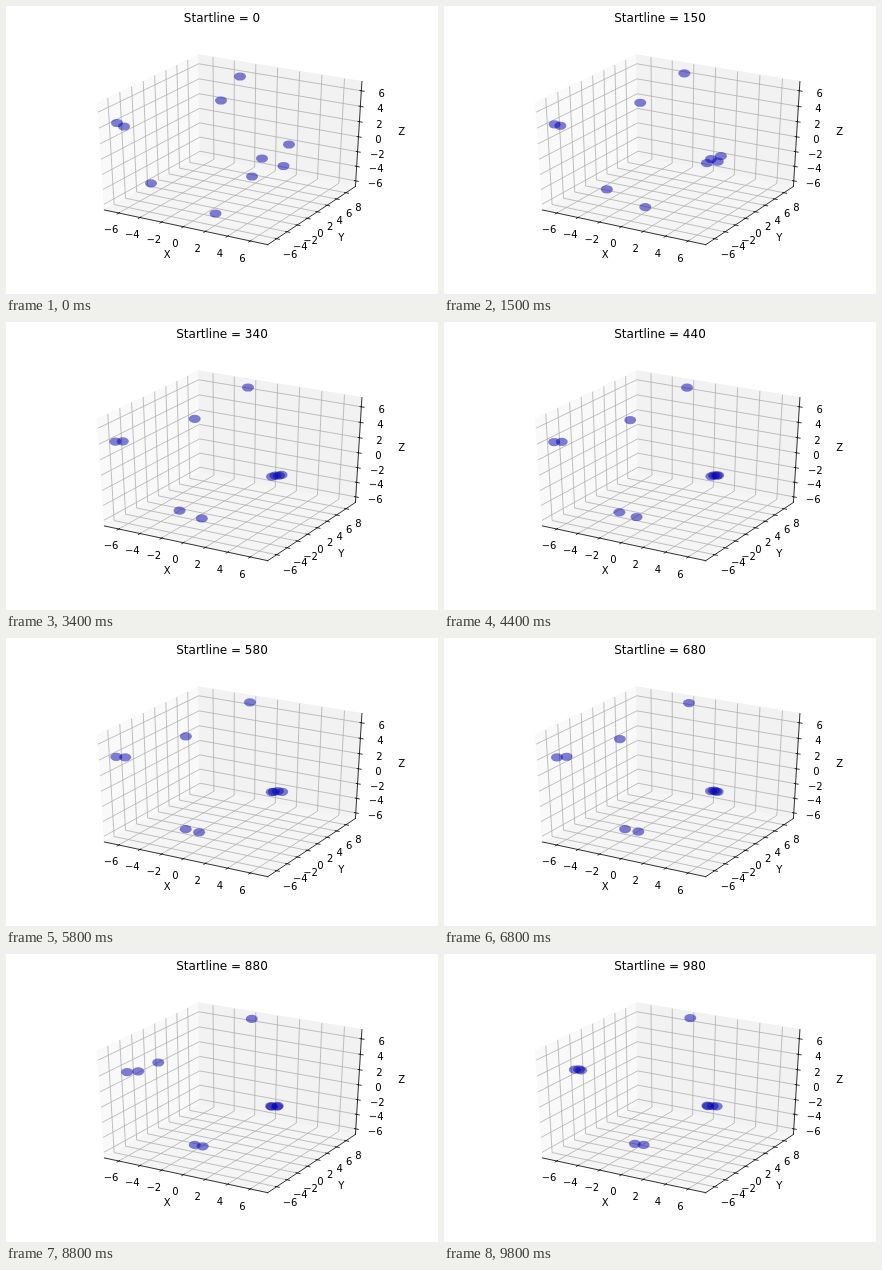
An HTML page for the animation above (9.9 s loop, 432x288 px).

```html
<!DOCTYPE html>
<html lang="en">
<head>
<meta charset="utf-8">
<title>Startline</title>
<style>
  html, body { margin: 0; width: 100%; height: 100%; overflow: hidden; background: #fff; }
  svg { display: block; width: 432px; height: 288px; }
  text { font-family: "DejaVu Sans", sans-serif; font-size: 10px; text-anchor: middle; }
  #title { font-size: 12px; }
  .grid { fill: none; stroke: #b0b0b0; stroke-width: 0.8; }
  .axis { fill: none; stroke: #000; stroke-width: 0.8; stroke-linecap: square; }
  .ball { fill: #0000b0; fill-opacity: 0.5; }
</style>
</head>
<body>
<svg id="stage" viewBox="0 0 432 288">
  <g id="box"></g>
  <g id="balls"></g>
  <text id="title" x="216" y="16"></text>
</svg>
<script>
const $ = id => document.getElementById(id);
const box = $('box'), title = $('title');

function add(parent, name, attrs, text) {
  const el = document.createElementNS('http://www.w3.org/2000/svg', name);
  for (const k in attrs) el.setAttribute(k, attrs[k]);
  if (text) el.textContent = text;
  parent.appendChild(el);
  return el;
}

// Perspective view of a unit cube centred on 0: azimuth -60°, elevation 30°, distance 10.
const C = Math.sqrt(3) / 2;
function project([x, y, z]) {
  const depth = 10 - (C / 2 * x - 0.75 * y + 0.5 * z);
  const u = (C * x + 0.5 * y) / depth;
  const v = (-0.25 * x + C / 2 * y + C * z) / depth;
  return [54 + (u + 0.095) / 0.185 * 334.8, 252 - (v + 0.095) / 0.185 * 217.44];
}
const path = pts => 'M' + pts.map(p => project(p).map(n => n.toFixed(2)).join(' ')).join('L');
const line = (cls, ...pts) => add(box, 'path', { class: cls, d: path(pts) });
const pane = (fill, ...pts) => add(box, 'path', { fill, stroke: fill, d: path(pts) + 'Z' });

function label(text, pos, dy) {
  const [x, y] = project(pos);
  add(box, 'text', { x: x.toFixed(1), y: Math.round(y + dy) }, text);
}

const H = 0.5 + 1 / 48;         // half size of the drawn box
const OUT = H + 1 / 60, IN = H - 1 / 120;
const NEAR = H + 0.0833, FAR = H + 0.1811;

const axes = [
  { name: 'X', lo: -7.07, hi: 7.23, last: 6, ends: [[-H, -H, -H], [H, -H, -H]],
    grid: a => [[a, H, H], [a, H, -H], [a, -H, -H]],
    tick: a => [[a, -OUT, -H], [a, -IN, -H]],
    at: (a, d) => [a, -d, -d] },
  { name: 'Y', lo: -7.33, hi: 9.7, last: 8, ends: [[H, -H, -H], [H, H, -H]],
    grid: a => [[-H, a, H], [-H, a, -H], [H, a, -H]],
    tick: a => [[OUT, a, -H], [IN, a, -H]],
    at: (a, d) => [d, a, -d] },
  { name: 'Z', lo: -6.5, hi: 6.9, last: 6, ends: [[H, H, -H], [H, H, H]],
    grid: a => [[-H, -H, a], [-H, H, a], [H, H, a]],
    tick: a => [[OUT, H, a], [IN, H, a]],
    at: (a, d) => [d, d, a] }
];

pane('#f9f9f9', [-H, -H, -H], [-H, H, -H], [-H, H, H], [-H, -H, H]);
pane('#f2f2f2', [-H, H, -H], [H, H, -H], [H, H, H], [-H, H, H]);
pane('#f5f5f5', [-H, -H, -H], [H, -H, -H], [H, H, -H], [-H, H, -H]);

const eachTick = (ax, fn) => {
  for (let v = -6; v <= ax.last; v += 2) fn((v - ax.lo) / (ax.hi - ax.lo) - 0.5, v);
};
for (const ax of axes) eachTick(ax, a => line('grid', ...ax.grid(a)));
for (const ax of axes) {
  line('axis', ...ax.ends);
  eachTick(ax, (a, v) => {
    line('axis', ...ax.tick(a));
    label(String(v).replace('-', '\u2212'), ax.at(a, NEAR), 7.6);
  });
  label(ax.name, ax.at(0, FAR), 3.04);
}

// Balls relax from their starts towards a hub, side by side; the hub drifts away late in the loop.
const hubs = [
  { at: [113, 120], drift: [21, -4], gap: 9, settle: 20, starts: [[111, 117], [118, 120.5]] },
  { at: [186, 192.5], drift: [10, -2], gap: 7, settle: 25, starts: [[145, 177.3], [209.5, 207.5]] },
  { at: [186, 97], drift: [-52, 18.5], gap: 0, settle: 15, starts: [[215, 94.5]] },
  { at: [245, 64.5], drift: [0, 0], gap: 0, settle: 25, starts: [[234, 70.5]] },
  { at: [271, 153.5], drift: [-4, -1.5], gap: 3, settle: 10,
    starts: [[246, 170.5], [256, 152.5], [277.5, 160], [283, 138.5]] }
];

const noise = n => {
  const s = Math.sin(n * 127.1 + 11.7) * 43758.5453;
  return (s - Math.floor(s)) * 2 - 1;
};

const balls = hubs.flatMap(hub => hub.starts.map((start, k) => ({
  hub, start,
  side: (k - (hub.starts.length - 1) / 2) * hub.gap,
  el: add($('balls'), 'ellipse', { class: 'ball', rx: 6, ry: 4.1 })
})));

function place({ hub, start, side }, i, step) {
  const left = Math.exp(-step / hub.settle);
  const late = (step / 98) ** 4;
  const shake = 1 - Math.exp(-step / 5);
  return [0, 1].map(c => {
    const goal = hub.at[c] + hub.drift[c] * late + (c ? 0 : side);
    const jitter = noise(step * 20 + i * 2 + c) * (c ? 0.8 : 1.5);
    return goal + (start[c] - goal) * left + jitter * shake;
  });
}

function draw(ms) {
  const step = Math.floor(ms / 100) % 99;
  title.textContent = 'Startline = ' + step * 10;
  balls.forEach((ball, i) => {
    const [x, y] = place(ball, i, step);
    ball.el.setAttribute('cx', x.toFixed(2));
    ball.el.setAttribute('cy', y.toFixed(2));
  });
}

const start = performance.now();
function tick() {
  draw(performance.now() - start);
  requestAnimationFrame(tick);
}
tick();
</script>
</body>
</html>
```
